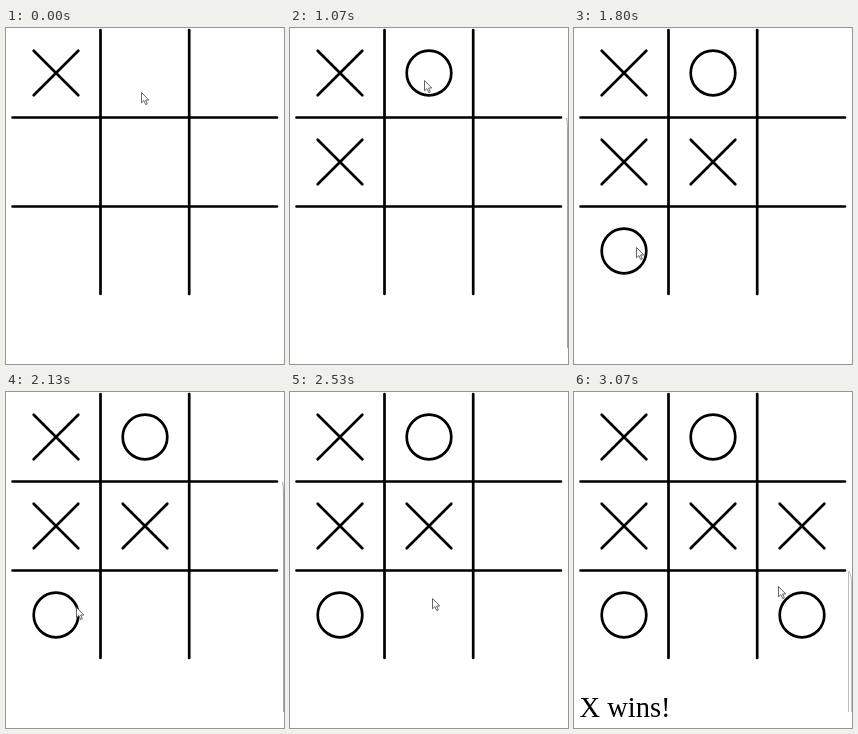
An HTML page that plays this animation: 278 px wide and 336 px high, repeating every 3190 ms.

```html
<!DOCTYPE html>
<html lang="en">
<head>
<meta charset="utf-8">
<title>Tic-tac-toe</title>
<style>
html, body { margin: 0; width: 100%; height: 100%; overflow: hidden; background: #fff; }
svg { display: block; width: 278px; height: 336px; }
.ink { fill: none; stroke: #000; stroke-width: 2.7; stroke-linecap: round; }
.edge { fill: none; stroke: #a4a4a4; }
text { font: 28.5px "Liberation Serif", "Times New Roman", serif; }
</style>
</head>
<body>
<svg viewBox="0 0 278 336">
  <path class="ink" stroke-linecap="butt" d="M6.5 89.5H271M6.5 178.5H271M94.5 2V266M183.2 2V266"/>
  <g id="marks" class="ink"></g>
  <text id="result" x="5.5" y="325">X wins!</text>
  <path id="edgeLong" class="edge" d="M276.5 90Q277.5 92 277.5 104V320"/>
  <path id="edgeShort" class="edge" d="M274.5 179Q277.5 182 277.5 192V320M274.5 180V320" stroke-opacity=".7"/>
  <path id="cursor" d="M.5 .5V10.8L2.9 8.6L4.7 12.6L6.3 11.9L4.6 8H7.8Z"
        fill="#fff" stroke="#555" stroke-width=".9" stroke-linejoin="round"/>
</svg>
<script>
const LOOP = 3190, STEP = 200 / 3, CELL = 89, R = 22.3;
const $ = id => document.getElementById(id);

// kind, column, row, time of the move
const moves = [
  ["X", 0, 0, 0], ["O", 1, 0, 600], ["X", 0, 1, 670],
  ["O", 0, 2, 1670], ["X", 1, 1, 1730],
  ["O", 2, 2, 2800], ["X", 2, 1, 2865]
];

// time, x, y of the pointer tip
const path = [
  [0, 135, 64], [400, 134, 52], [1070, 134, 52], [1200, 112, 96],
  [1335, 78, 180], [1470, 62, 219], [1935, 62, 219], [2130, 69, 215],
  [2330, 106, 212], [2530, 141, 206], [2730, 204, 194], [LOOP, 204, 194]
];

const edgeTimes = [[1070, 1270], [2070, 2270], [2830, 3070]];

function addMark([kind, col, row, at]) {
  const x = 50 + col * CELL, y = 45 + row * CELL;
  const el = document.createElementNS($("marks").namespaceURI, "path");
  el.setAttribute("d", kind === "X"
    ? `M${x - R} ${y - R}l${2 * R} ${2 * R}M${x + R} ${y - R}l${-2 * R} ${2 * R}`
    : `M${x - R} ${y}a${R} ${R} 0 1 1 ${2 * R} 0a${R} ${R} 0 1 1 ${-2 * R} 0`);
  $("marks").append(el);
  return { el, at };
}

const marks = moves.map(addMark);

function show(el, on) {
  el.style.visibility = on ? "visible" : "hidden";
}

function pointer(t) {
  const i = Math.max(1, path.findIndex(p => p[0] >= t));
  const [t0, x0, y0] = path[i - 1], [t1, x1, y1] = path[i];
  const k = (t - t0) / (t1 - t0);
  return [x0 + (x1 - x0) * k, y0 + (y1 - y0) * k].map(Math.round);
}

function draw(now) {
  const t = now % LOOP;
  const held = Math.floor((t + 4) / STEP) * STEP;
  for (const { el, at } of marks) show(el, t >= at);
  show($("result"), t >= 2865);
  show($("edgeLong"), edgeTimes.some(([a, b]) => t >= a && t < b));
  show($("edgeShort"), t >= 3070);
  $("cursor").setAttribute("transform", `translate(${pointer(Math.min(held, LOOP))})`);
}

const start = performance.now();
function tick() {
  draw(performance.now() - start);
  requestAnimationFrame(tick);
}
tick();
</script>
</body>
</html>
```
